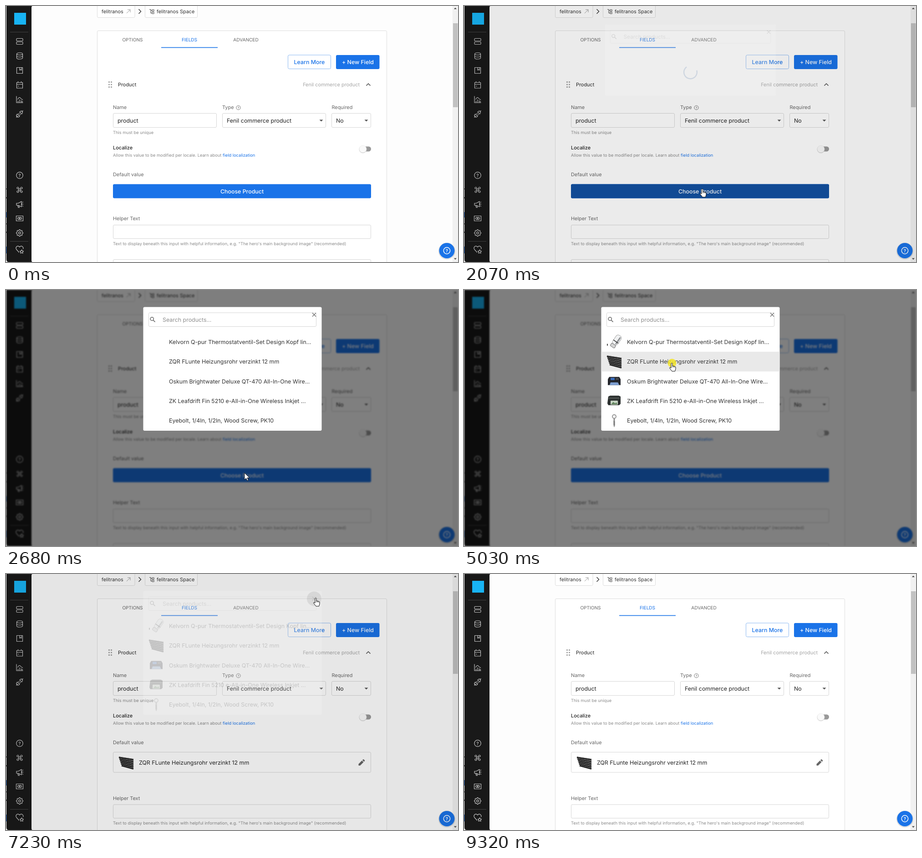
Recreate the animation shown at these times as an HTML page. Size 993x564 px, loop 9.39 s.

```html
<!DOCTYPE html>
<html lang="en">
<head>
<meta charset="utf-8">
<title>Choose a product</title>
<style>
html, body { margin: 0; width: 100%; height: 100%; overflow: hidden; background: #fff; }
svg, #dim { position: absolute; left: 0; top: 0; width: 993px; height: 564px; }
svg { font-family: Inter, "Open Sans", sans-serif; text-rendering: geometricPrecision; overflow: hidden; }
#dim { left: 1px; background: #000; }
#dialog { transform-origin: 497.5px 120px; }
</style>
</head>
<body>
<svg id="page"></svg>
<div id="dim"></div>
<svg id="dialog"></svg>
<svg id="pointer"></svg>
<script>
const LOOP = 9390, BLUE = '#1a73e8', DARK = '#1250a0', GREY = '#666', EDGE = '#d6d6d6';
const $ = id => document.getElementById(id);

const text = (x, y, s, size = 10.9, fill = '#333', weight = 400, anchor = 'start') =>
  `<text x="${x}" y="${y + size * .36}" font-size="${size}" fill="${fill}" font-weight="${weight}" text-anchor="${anchor}">${s}</text>`;
const rect = (x, y, w, h, fill = '#fff', stroke = 'none', r = 2.5, more = '') =>
  `<rect x="${x}" y="${y}" width="${w}" height="${h}" rx="${r}" fill="${fill}" stroke="${stroke}" ${more}/>`;
const line = (d, stroke = '#555', w = 1.3, x = 0, y = 0) =>
  `<path transform="translate(${x} ${y})" d="${d}" fill="none" stroke="${stroke}" stroke-width="${w}" stroke-linejoin="round"/>`;
const shape = (d, fill, more = '') => `<path d="${d}" fill="${fill}" ${more}/>`;
const ring = (x, y, r, stroke, w, fill = 'none', more = '') =>
  `<circle cx="${x}" cy="${y}" r="${r}" stroke="${stroke}" stroke-width="${w}" fill="${fill}" ${more}/>`;
const group = (id, s, x = 0, y = 0) => `<g id="${id}" transform="translate(${x} ${y})">${s}</g>`;
const circlePath = (x, y, r) => `M${x - r} ${y}a${r} ${r} 0 1 0 ${2 * r} 0a${r} ${r} 0 1 0 ${-2 * r} 0`;

// Sidebar icons: centre height and outline around the centre
const gear = Array.from({ length: 32 }, (_, i) => {
  const a = (i - .5) * Math.PI / 16, r = i % 4 < 2 ? 7.4 : 5.8;
  return (i ? 'L' : 'M') + (r * Math.cos(a)).toFixed(1) + ' ' + (r * Math.sin(a)).toFixed(1);
}).join('') + 'z';
const icons = [
  [78, 'M-5.5-6.5h11q1.5 0 1.5 1.5v2.5q0 1.5-1.5 1.5h-11q-1.5 0-1.5-1.5V-5q0-1.5 1.5-1.5zM-5.5 1h11q1.5 0 1.5 1.5V5q0 1.5-1.5 1.5h-11Q-7 6.5-7 5V2.5Q-7 1-5.5 1z'],
  [110, 'M-6.5-4.5a6.5 2.5 0 1 0 13 0a6.5 2.5 0 1 0-13 0V4.5a6.5 2.5 0 0 0 13 0V-4.5M-6.5 0a6.5 2.5 0 0 0 13 0'],
  [142, 'M-6.5-6.5h13v13h-13zM0-6.5v6l2-1.5 2 1.5v-6'],
  [174, 'M-6.5-5.5h13V7h-13zM-6.5-1.5h13M-3.5-8v3M3.5-8v3M-4 2.5h2.5'],
  [206, 'M-7-7.5V7H7.5M-3.5 7V3M0 7V0M3.5 7V2M6 7V3M-4.5 0Q-1-7 2-3T7 0'],
  [238, 'M-7.5 7.5l3-3M7.5-7.5l-3 3M-5 0l5 5-2 1.5q-2 1-4-1t-.5-4zM0-4.5L4.5 0 6-2q1-2-.5-4T2-6zM-2.5 0l2-2M0 2.5l2-2'],
  [373, circlePath(0, 0, 7.2)],
  [405, 'M-2-2h4v4h-4zM-2-2h-2a2 2 0 1 1 2-2zM2-2V-4a2 2 0 1 1 2 2zM2 2h2a2 2 0 1 1-2 2zM-2 2v2a2 2 0 1 1-2-2z'],
  [437, 'M-7-2.5h4L4-6.5v12L-3 2h-4zM-4.5 2l1.5 5h2.5L-2 2.5M4-2.5q3 2 0 4M6-4l1.5-1.5M7-.5h1.5M6 3l1.5 1.5'],
  [468, 'M-7.5-5.5h15v11h-15z' + circlePath(-1.8, 0, 2.4) + circlePath(1.8, 0, 2.4)],
  [500, gear + circlePath(0, 0, 2.3)],
  [537, 'M-1 6L-7-.5q-2.5-4 .5-6.5t6.5 1q3-3.5 6-1t1.5 5.5M4.5 0l1.3 2.6 2.7.4-2 2 .5 2.8-2.5-1.3-2.5 1.3.5-2.8-2-2 2.7-.4z']
];
const sidebar = shape('M1-2H60V564H6Q1 564 1 558z', '#191919')
  + rect(18, 15, 26, 26, '#18b4f4', 'none', 0)
  + line('M9 57.5H49M9 518.5H49', '#444', 1)
  + icons.map(([y, d]) => line(d, '#c4c4c4', 1.2, 30, y)).join('')
  + text(30, 373, '?', 10, '#c4c4c4', 500, 'middle')
  + [[402, 2], [421, 3], [479, 2], [497, 3]].map(([y, h]) => rect(0, y, 1, h, '#555', 'none', 0)).join('')
  + rect(0, 454, 1, 12, '#3a7bd5', 'none', 0) + rect(0, 530, 1, 15, '#3a7bd5', 'none', 0);

// Product thumbnails, 32 x 32
const pipes = Array.from({ length: 6 }, (_, i) => {
  const d = `M${i * 1.2} ${4 + i * 3.6}L32 ${9 + i * 4}`;
  return line(d, '#1c1c1c', 3.4) + line(d, '#8a8a8a', .7, 0, -1.2);
}).join('');
const bolt = ring(16, 6.5, 4, '#999', 2) + shape('M14.5 10.5h3v16l-1.5 4-1.5-4z', '#8c8c8c')
  + line('M14 17l4 2m-4 1l4 2m-4 1l4 2', '#555', .8);
const valve = `<g transform="rotate(35 19 15)">${rect(13, -1, 13, 23, '#f1f2f3', '#aaa', 5)}${rect(21, 1, 3, 19, '#8d9093')}${rect(13, 14, 13, 1.5, '#333', 'none', 0)}${rect(14, 22, 11, 7, '#d5d5d5', '#777', 2)}</g>`
  + rect(0, 20, 2, 4, '#444', 'none', 0);
const bluePrinter = shape('M5 6h22l3 5v13H2V11z', '#23252b') + rect(8, 8, 9, 5, '#3b6fc0', 'none', 1)
  + rect(19, 9, 7, 3, '#555', 'none', 1) + shape('M8 18h16l3 6H6z', '#7d9fd2');
const darkPrinter = shape('M3 6l4-2h19l4 2v16l-3 3H3L1 21z', '#2c302f') + rect(4, 8, 24, 3, '#4b504e', 'none', 1)
  + rect(8, 15, 16, 9, '#c8d6c4', 'none', 1) + shape('M9 23l5-5 4 3 3-2 2 4z', '#5d8059');
const thumbs = [valve, pipes, bluePrinter, darkPrinter, bolt];
const thumbTimes = [3410, 3340, 3340, 3280, 3480];
const products = [
  'Kelvorn Q-pur Thermostatventil-Set Design Kopf lin...',
  'ZQR FLunte Heizungsrohr verzinkt 12 mm',
  'Oskum Brightwater Deluxe QT-470 All-In-One Wire...',
  'ZK Leafdrift Fin 5210 e-All-in-One Wireless Inkjet ...',
  'Eyebolt, 1/4In, 1/2In, Wood Screw, PK10'
];
const rowTop = i => 92.6 + 43.4 * i;

const caret = x => shape(`M${x - 4} 250.5h8l-4 4z`, '#555');
const helper = text(235, 468.5, 'Helper Text', 10.9, GREY)
  + rect(235.5, 482.5, 566, 30, '#fff', EDGE)
  + text(235, 523.5, 'Text to display beneath this input with helpful information, e.g. "The hero\'s main background image" (recommended)', 9.3, '#8a8a8a')
  + rect(235.5, 558.5, 566, 40, '#fff', EDGE);

$('page').innerHTML = sidebar
  + rect(56, -0.5, 940, 565, '#fdfdfd', 'none', 4)
  + rect(200.5, -8, 82.5, 33.5, '#fff', '#ddd') + text(210, 12.5, 'felitranos')
  + line('M265 16l8-8M267 8h6v6', '#999', 1)
  + line('M291.5 7l5 5-5 5', '#444', 1.7)
  + rect(305.5, -8, 115, 33.5, '#fff', '#ddd') + text(331, 12.5, 'felitranos Space')
  + line('M315 7.5h3v8h3M318 10h3M321 8h4v3.5h-4zM321 13.5h4V17h-4z', '#555', 1.1)
  + rect(200.5, 54.5, 636, 530, '#fff', '#dedede')
  + text(278, 74, 'OPTIONS', 10.1, GREY, 400, 'middle')
  + text(403, 74, 'FIELDS', 10.1, BLUE, 400, 'middle')
  + text(527, 74, 'ADVANCED', 10.1, GREY, 400, 'middle')
  + rect(341, 90.7, 124, 1.6, BLUE, 'none', 0)
  + rect(619.5, 108, 94, 30.5, '#fff', '#8bb8f2', 3)
  + rect(619.5, 108, 94, 30.5, '#e3eefc', BLUE, 3, 'id="learnHover"')
  + text(666.5, 123.7, 'Learn More', 12.4, BLUE, 500, 'middle')
  + rect(725, 108, 95.5, 31, BLUE, 'none', 3)
  + rect(725, 108, 95.5, 31, DARK, 'none', 3, 'id="newHover"')
  + text(773, 123.7, '+ New Field', 12.4, '#fff', 500, 'middle')
  + [167.5, 173, 178.5].map(y => [226.5, 231.5].map(x => ring(x, y, 1.6, 'none', 0, '#999')).join('')).join('')
  + text(246, 173, 'Product', 10.9, '#222')
  + text(777, 173, 'Fenil commerce product', 10.9, '#a5a5a5', 400, 'end')
  + line('M791.5 175.5l4.5-4.5 4.5 4.5', '#555', 1.7)
  + text(235, 223.5, 'Name', 10.9, GREY) + text(475, 223.5, 'Type', 10.9, GREY) + text(715.5, 223.5, 'Required', 10.9, GREY)
  + ring(510.5, 224, 4.6, '#777', 1) + text(510.5, 224, '?', 7, GREY, 500, 'middle')
  + rect(235.5, 236.5, 227, 31, '#fff', EDGE) + text(245, 252.5, 'product', 12.4, '#222')
  + rect(475.5, 236.5, 227, 31, '#fff', EDGE) + text(485, 252.5, 'Fenil commerce product', 12.4, '#222') + caret(692.5)
  + rect(715.5, 236.5, 86, 31, '#fff', EDGE) + text(725, 252.5, 'No', 12.4, '#222') + caret(791.5)
  + text(235, 278.5, 'This must be unique', 9.3, '#8a8a8a')
  + text(235, 312, 'Localize', 10.9, '#222', 500)
  + text(235, 328.5, `Allow this value to be modified per locale. Learn about <tspan fill="${BLUE}">field localization</tspan>`, 9.3, '#8a8a8a')
  + rect(779, 309.5, 23, 11, '#999', 'none', 5.5)
  + ring(784, 315.7, 8, '#ccc', 1, '#ddd') + ring(784, 315, 7.7, '#eee', .5, '#fafafa')
  + text(235, 371.5, 'Default value', 10.9, GREY)
  + group('empty', rect(235, 392.5, 567, 31, BLUE, 'none', 3)
    + rect(235, 392.5, 567, 31, DARK, 'none', 3, 'id="chooseHover"')
    + text(518.5, 408.3, 'Choose Product', 12.4, '#fff', 500, 'middle'))
  + group('chosen', rect(235.5, 392.5, 566, 44.5, '#fff', EDGE)
    + group('chosenThumb', pipes, 248, 400)
    + text(292, 415.3, products[1], 12.4, '#222')
    + shape('M774.5 418.5v3.5h3.5l7.5-7.5-3.5-3.5zM783 410l3.5 3.5 1.5-1.5q.7-.8 0-1.6l-1.9-1.9q-.8-.7-1.6 0z', GREY))
  + group('helper', helper)
  + rect(981, 0, 12, 564, '#f1f1f1', 'none', 0)
  + rect(982, 38, 10.5, 185, '#c1c1c1', 'none', 0, 'id="thumb"')
  + shape('M984 7h6l-3-3.5z', '#505050') + shape('M984 555.5h6l-3 3.5z', '#505050')
  + ring(968.5, 540, 17.5, '#0002', 2) + ring(968.5, 539, 17, 'none', 0, BLUE)
  + ring(968.5, 539, 7.2, '#fff', 1.5) + text(968.5, 539, '?', 10, '#fff', 600, 'middle');

$('dialog').innerHTML = rect(301.5, 37.5, 392, 272.5, '#fff', 'none', 3, 'id="panel"')
  + rect(313.5, 50, 368, 30.5, '#fff', EDGE)
  + ring(320.7, 63.7, 3.6, '#666', 1.5) + line('M323.5 66.5l4 4', '#666', 1.7)
  + text(344, 65.5, 'Search products...', 12.4, '#8f8f8f')
  + line('M673 50.5l8 8M681 50.5l-8 8', '#666', 1.1)
  + group('spinner', line('M14.1 5A15 15 0 1 1 0-15', '#3a68ab', 2.5))
  + group('list', products.map((name, i) =>
      rect(301.5, rowTop(i), 392, 43.4, '#e9e9e9', 'none', 0, `id="row${i}"`)
      + group('pic' + i, thumbs[i], 314, rowTop(i) + 6)
      + text(358, rowTop(i) + 21.8, name, 12.4, '#333')).join(''));

$('pointer').innerHTML = ring(677, 54.5, 16, 'none', 0, '#000', 'id="closeHover"')
  + group('click', ring(0, 0, 9.5, 'none', 0, '#f3e52ee0'))
  + group('arrow', shape('M0 0V15l3.5-3.3 2.4 5.3 2.4-1-2.4-5.2H11z', '#fff', 'stroke="#111" stroke-width=".9"'))
  + group('hand', shape('M-2 1.5Q-2 0-.5 0T1 1.5V6l5.5 1.5Q8 8 8 9.5V13l-1.5 5H0l-5-6.5Q-6 9.5-4 9.5L-2 11z', '#fff', 'stroke="#111" stroke-width="1"')
    + line('M1 6v3.5M3.5 7v2.5M6 7.8v2', '#111', .8));

const clamp = u => Math.max(0, Math.min(1, u));
const ramp = (t, a, b) => clamp((t - a) / (b - a));
const smooth = u => u * u * (3 - 2 * u);
const within = (t, a, b) => t >= a && t < b;

// Pointer moves: start, end, destination
const moves = [[250, 1140, 524, 403], [4080, 4830, 457, 161], [5850, 6820, 681, 53], [8240, 8990, 957, 541]];
function cursor(t) {
  let x = 806, y = 505;
  for (const [a, b, tx, ty] of moves) {
    const u = smooth(ramp(t, a, b));
    x += (tx - x) * u;
    y += (ty - y) * u;
  }
  return [x, y];
}

// Hot areas: id, x, y, width, height, active from, active until
const areas = [
  ['chooseHover', 235, 392, 567, 32, 250, 2080],
  ...products.map((_, i) => ['row' + i, 302, rowTop(i), 391, 43.4, 2700, 7000]),
  ['closeHover', 663, 40, 28, 28, 2700, 7370],
  ['learnHover', 619, 108, 95, 31, 7370, LOOP],
  ['newHover', 725, 108, 95, 31, 7370, LOOP],
  ['', 951, 522, 34, 34, 7370, LOOP]
];
function over([, x, y, w, h, from, to], t) {
  const [cx, cy] = cursor(t);
  return within(t, from, to) && within(cx, x, x + w) && within(cy, y, y + h);
}
// A hover fades because it averages the recent past
function hover(area, t) {
  let n = 0;
  for (let i = 0; i < 8; i++) n += over(area, t - i * 25);
  return n / 8;
}

const show = (id, on) => $(id).style.display = on ? '' : 'none';
const place = (id, x, y, more = '') => $(id).setAttribute('transform', `translate(${x} ${y})${more}`);

function draw(t) {
  const opening = ramp(t, 2040, 2240);
  const shade = opening * (1 - ramp(t, 7000, 7285));
  const loaded = t >= 2600, chosen = t >= 5230;

  $('dim').style.opacity = shade / 2;
  $('page').style.filter = shade > .2 ? `blur(${1.5 * shade}px)` : 'none';
  $('dialog').style.opacity = shade;
  $('dialog').style.transform = `scale(${.95 + .05 * opening})`;
  $('panel').setAttribute('height', loaded ? 272.5 : 163.5);
  show('spinner', !loaded);
  show('list', loaded);
  place('spinner', 497.5, 147, ` rotate(${(t - 2210) * 360 / 1400})`);
  thumbTimes.forEach((at, i) => show('pic' + i, t >= at));

  show('empty', !chosen);
  show('chosen', chosen);
  show('chosenThumb', t >= 5570);
  place('helper', 0, chosen ? 25.5 : 0);
  $('thumb').setAttribute('height', chosen ? 182 : 185);

  for (const area of areas) if (area[0])
    $(area[0]).style.opacity = hover(area, t) * (area[0] === 'closeHover' ? .08 : 1);

  const [x, y] = cursor(t), hand = areas.some(a => over(a, t)), visible = within(t, 250, 9320);
  for (const id of ['arrow', 'hand', 'click']) place(id, x, y);
  show('hand', visible && hand);
  show('arrow', visible && !hand);
  show('click', within(t, 1900, 2040) || within(t, 5030, 5230) || within(t, 7020, 7160));
}

const start = performance.now();
function tick() {
  draw((performance.now() - start) % LOOP);
  requestAnimationFrame(tick);
}
tick();
</script>
</body>
</html>
```
